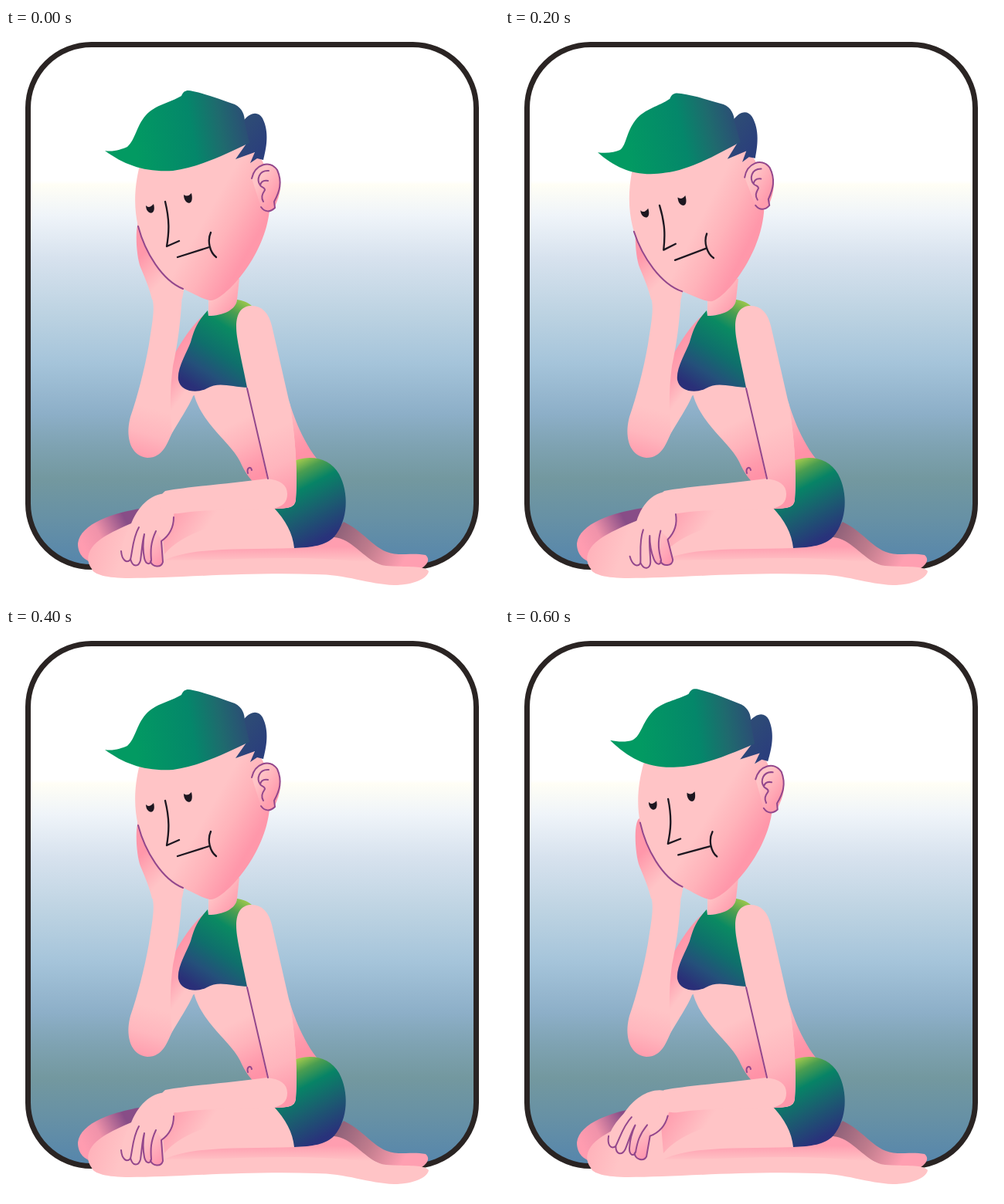
Write an HTML page that moves like this. It is 638 px wide and 740 px high and loops after 0.8 s.

```html
<!DOCTYPE html>
<html lang="en">
<head>
<meta charset="utf-8">
<title>Daydreamer by the sea</title>
<style>
html, body { margin: 0; width: 100%; height: 100%; overflow: hidden; background: #fff; }
svg { display: block; width: 638px; height: 740px; }
.line { fill: none; stroke: #93478c; stroke-width: 2; stroke-linecap: round; stroke-linejoin: round; }
.ink { fill: none; stroke: #1d1720; stroke-width: 2.3; stroke-linecap: round; stroke-linejoin: round; }
</style>
</head>
<body>
<svg viewBox="0 0 638 740">
  <defs id="defs"></defs>

  <rect x="28.5" y="21.5" width="580" height="677" rx="82" fill="url(#sea)" stroke="#2a2423" stroke-width="7"/>

  <!-- far leg -->
  <path fill="url(#farKnee)" d="M178 622C140 628 96 642 93 668C93 684 103 690 112 693L170 650L210 620Z"/>
  <path fill="url(#farFoot)" d="M437 640C468 655 478 681 508 682C522 682 533 681 543 683C549 688 546 695 538 700L490 699C460 690 444 668 418 664Z"/>

  <!-- far upper arm and torso -->
  <path fill="url(#upperArm)" d="M258 370C241 384 227 406 216 426L206 542C216 520 235 495 242 477L268 455Z"/>
  <path fill="url(#torso)" d="M241 462C245 508 291 536 303 562C310 578 316 584 321 590L370 620L402 558C386 537 375 512 367 486L330 400L280 400Z"/>
  <path class="line" d="M313 577C311 570 317 567 318 573"/>
  <path fill="url(#neck)" d="M262 325H302L299 352C298 366 282 373 262 373Z"/>
  <path fill="url(#top)" d="M261 366C246 382 243 393 239 407C234 421 221 441 223 456C226 472 248 474 260 467C275 458 290 465 314 466L308 380L318 360C312 355 306 353 299 352C298 365 281 373 262 373Z"/>

  <!-- near leg and shorts -->
  <path fill="url(#leg)" d="M220 620H390V674L420 660C446 660 466 695 492 697C515 699 542 696 547 704C546 713 528 722 502 722C470 721 440 708 400 708C310 705 215 713 160 713C130 713 113 708 111 701C101 688 107 672 126 660C145 648 180 634 220 620Z"/>
  <path fill="url(#calf)" d="M205 690C240 673 300 676 374 674C395 673 410 669 424 660C447 661 462 687 485 696C400 680 300 690 205 690Z"/>
  <path fill="url(#thigh)" d="M200 622H345C320 640 240 640 205 682Z"/>
  <path fill="url(#shorts)" d="M366 564C390 551 419 556 431 578C444 602 443 638 425 659C414 671 396 673 373 674C371 655 362 638 346 621Z"/>

  <!-- resting hand -->
  <g id="hand">
    <path fill="#ffc4c6" d="M222 606C195 596 172 615 161 645C154 658 149 669 150 680C152 692 158 693 162 689C166 699 173 697 175 689C179 696 184 696 188 692C190 699 202 700 203 692L202 664C211 659 217 648 217 632Z"/>
    <path fill="url(#finger)" d="M179 656L178 688C181 696 186 696 188 692C190 699 202 700 203 692L202 664L194 652Z"/>
    <path class="line" d="M149 678C150 690 156 694 161 689C164 676 164 661 172 647M161 688C164 700 172 698 174 690C176 677 176 666 179 656C177 667 177 677 179 687C181 696 187 696 188 690C187 677 187 667 194 652M187 691C189 699 201 700 203 692L201 665C211 658 217 648 217 634"/>
  </g>

  <!-- near arm -->
  <path fill="#ffc4c6" d="M299 400C295 371 304 360 318 360C331 360 340 369 344 386C352 420 361 460 367 486C373 520 378 570 375 611C374 622 366 622 352 623C305 624 255 624 224 629C204 631 186 618 206 600C240 594 295 590 338 584L312 466C307 440 301 415 299 400Z"/>
  <path fill="url(#elbow)" d="M312 466L338 584C355 586 364 592 364 604C364 615 358 620 346 623C362 623 374 622 375 611C378 570 373 520 367 486Z"/>
  <path class="line" d="M312 467L339 584"/>

  <!-- propping arm -->
  <path fill="url(#forearm)" d="M188 347C194 360 189 383 185 410C179 444 170 478 161 504C154 530 161 555 183 557C203 557 209 538 215 524C212 495 212 469 216 438C222 410 226 382 228 343Z"/>
  <path fill="url(#palm)" d="M174 248C166 252 168 294 174 310C182 329 186 339 189 352L228 351L232 330L190 260Z"/>

  <g id="head">
    <path fill="url(#face)" d="M173 178C165 210 166 236 171 257C180 291 202 327 229 338C248 347 258 353 266 353C284 351 335 296 341 236C343 204 339 182 329 168L305 148L200 170Z"/>
    <path class="line" d="M171 257C180 291 202 327 229 338"/>
    <path fill="url(#ear)" d="M318 195C322 177 341 170 351 184C358 200 356 215 347 233C341 240 334 238 330 232Z"/>
    <path class="line" d="M318 195C322 177 341 170 351 184C358 200 354 212 347 225L348 233C342 239 335 239 330 232M340 185C327 184 324 197 329 204C331 207 335 206 335 210C331 216 330 220 333 225M339 198C333 197 330 199 329 204"/>
    <path fill="url(#hair)" d="M305 123C315 109 326 107 332 117C341 135 337 155 333 171L325 169L316 175L322 161L297 170L311 150Z"/>
    <path id="hat" fill="url(#cap)"/>
    <path fill="#1d1720" d="M181 230Q185 235 191 228C194 239 188 242 184 238Q181 235 181 230ZM230 216Q235 220 240 214C243 227 237 229 233 225Q230 222 230 216Z"/>
    <path class="ink" d="M206 225C212 250 211 265 208 283L224 276M222 297L263 284M265 265C260 276 264 291 272 297"/>
  </g>
</svg>

<script>
const skin = '#ffc4c6', blush = '#ff97aa';

// id: [x1, y1, x2, y2, [offset, colour]...]
const gradients = {
  sea: [0, 198, 0, 700, [0, '#fff'], [.01, '#fffef5'], [.09, '#eff4f9'], [.2, '#d7e2ee'], [.34, '#bdd3e2'],
    [.47, '#a5c4da'], [.6, '#8dafc8'], [.68, '#7fa3b3'], [.77, '#73989f'], [.87, '#6791a5'], [1, '#5585ac']],
  farKnee: [98, 668, 155, 638, [0, '#ff9cb0'], [.4, '#f093aa'], [1, '#884d87']],
  farFoot: [430, 645, 515, 690, [0, '#8d6078'], [.5, '#c07c8d'], [1, '#ff9fb1']],
  upperArm: [212, 430, 245, 455, [0, blush], [.45, '#ffa3b2'], [1, skin]],
  torso: [290, 515, 325, 582, [0, skin], [.4, '#ffb3bb'], [.8, '#ff9aac'], [1, '#ff92a7']],
  neck: [268, 345, 298, 368, [0, skin], [1, blush]],
  top: [312, 355, 242, 465, [0, '#9cc84c'], [.15, '#4f9f50'], [.32, '#0a8a62'], [.58, '#0f6f6c'], [.8, '#24507a'], [1, '#2a2f78']],
  leg: [107, 660, 200, 690, [0, '#ffb0b9'], [.5, skin], [1, skin]],
  calf: [0, 672, 0, 692, [0, '#ff9eb0'], [1, skin]],
  thigh: [215, 630, 255, 655, [0, '#ffa0b0'], [1, skin]],
  shorts: [380, 558, 430, 652, [0, '#a5cb4c'], [.15, '#4c9e50'], [.34, '#078366'], [.65, '#1b5c70'], [1, '#29327b']],
  finger: [178, 665, 203, 690, [0, skin], [1, '#ff98b0']],
  elbow: [335, 525, 372, 608, [0, skin], [.5, '#ffb5bd'], [1, blush]],
  face: [247, 265, 318, 306, [0, skin], [.4, '#ffb3ba'], [.85, blush], [1, '#ff98aa']],
  ear: [328, 195, 352, 210, [0, skin], [1, '#ff9dae']],
  hair: [310, 130, 337, 150, [0, '#2d4a76'], [1, '#2b3f7c']],
  cap: [165, 145, 315, 120, [0, '#029a62'], [.5, '#04876a'], [.75, '#1f6a6e'], [1, '#2d4a76']],
  palm: [170, 300, 200, 330, [0, blush], [.45, '#ffadb7'], [1, skin]],
  forearm: [178, 560, 196, 495, [0, '#ff9aac'], [.5, '#ffb7be'], [1, skin]]
};
const $ = id => document.getElementById(id);
$('defs').innerHTML = Object.entries(gradients).map(([id, [x1, y1, x2, y2, ...stops]]) =>
  `<linearGradient id="${id}" gradientUnits="userSpaceOnUse" x1="${x1}" y1="${y1}" x2="${x2}" y2="${y2}">` +
  stops.map(([at, colour]) => `<stop offset="${at}" stop-color="${colour}"/>`).join('') +
  '</linearGradient>').join('');

const rest = { head: 0, headShift: '0 0', hand: 0, handRise: 0, lift: 0, slide: 0 };
const left = { head: -3.2, headShift: '1 1.5', hand: -10, handRise: 1, lift: 7, slide: 2 };
const right = { head: 2.3, headShift: '0 0', hand: 14, handRise: 4, lift: 7, slide: 0 };
const poses = [rest, left, rest, right];

// The brim lifts and slides a little on the head.
const hatPath = (lift, slide) =>
  `M${128 + slide} ${159 - lift}C${139 + slide} ${161 - lift} ${150 + slide} ${157 - lift / 2} ${157 + slide} ${154 - lift / 2}` +
  'C168 144 168 128 181 113C194 99 212 97 227 88C230 81 234 80 242 82C261 86 279 93 296 99' +
  `C306 104 309 113 309 122L315 149C285 163 249 181 216 ${185 - lift / 4}` +
  `C180 187 154 ${178 - lift / 3} ${128 + slide} ${159 - lift}Z`;

function draw(now) {
  const pose = poses[Math.floor(now % 800 / 200)];
  $('head').setAttribute('transform', `translate(${pose.headShift}) rotate(${pose.head} 262 352)`);
  $('hand').setAttribute('transform', `translate(0 ${-pose.handRise}) rotate(${pose.hand} 200 610)`);
  $('hat').setAttribute('d', hatPath(pose.lift, pose.slide));
}
const start = performance.now();
function tick() {
  draw(performance.now() - start);
  requestAnimationFrame(tick);
}
tick();
</script>
</body>
</html>
```
